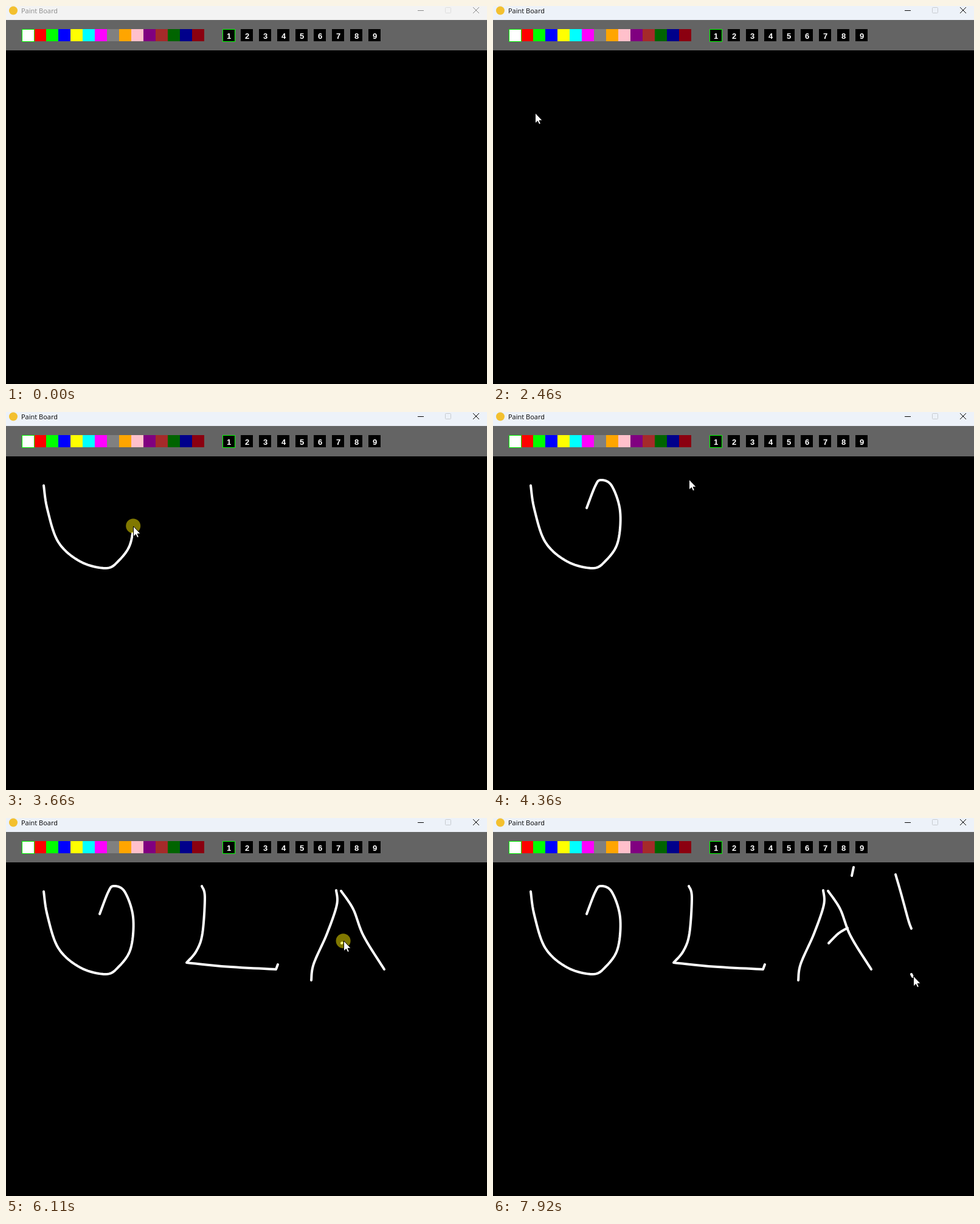
An HTML page with a canvas that plays this animation: 791x622 px, repeating every 7990 ms.

```html
<!DOCTYPE html>
<html lang="en">
<head>
<meta charset="utf-8">
<title>Paint Board</title>
<style>
  html, body { margin: 0; width: 100%; height: 100%; overflow: hidden; background: #000; }
  canvas { display: block; width: 791px; height: 622px; }
</style>
</head>
<body>
<canvas id="stage" width="791" height="622"></canvas>
<script>
const ctx = document.getElementById('stage').getContext('2d');
const LOOP = 7990;
const INK_LAG = 15;
const SETTLE = 60;

const palette = ['white', 'red', 'lime', 'blue', 'yellow', 'cyan', 'magenta', 'gray',
  'orange', 'pink', 'purple', 'brown', 'darkgreen', 'darkblue', '#8b0010'];

// Pen strokes; a repeated point makes a sharp corner.
const strokes = [
  pen(3290, 3860, [[62,121],[68,160],[86,214],[122,246],[164,257],[185,245],[205,215],
    [209,163],[195,121],[177,112],[168,122],[154,158]]),
  pen(4410, 4925, [[322,112],[327,130],[323,190],[313,219],[297,238],[297,238],
    [362,244.5],[444,249],[444,249],[447,241]]),
  pen(5150, 5410, [[543,119],[544,143],[528,190],[506,240],[502,267]]),
  pen(5550, 5840, [[551,120],[571,150],[588,194],[622,249]]),
  pen(6095, 6310, [[552,206],[568,190],[583,181]]),
  pen(6655, 6800, [[593,81],[590,95]]),
  pen(7020, 7370, [[662,93],[671,124],[683,168],[688,182]]),
  pen(7700, 7840, [[688,257],[690,261]])
];

// Pointer stops as time, x, y; the pen ends are added to them.
const stops = [
  [130,563,490], [410,269,264], [480,269,264], [690,167,143], [830,167,143], [1300,76,110],
  [1570,76,110], [1640,85,132], [2200,85,132], [2400,70,160], [2700,66,238], [3090,62,120],
  [7440,690,186], [7870,691,260]
];
for (const { from, to, pts } of strokes) {
  const a = pts[0], b = pts[pts.length - 1];
  stops.push([from - SETTLE, a.x, a.y - 1], [from, a.x, a.y - 1], [to, b.x, b.y - 1]);
}
stops.sort((a, b) => a[0] - b[0]);

function clamp(v) { return Math.max(0, Math.min(1, v)); }
function lerp(a, b, k) { return a + (b - a) * k; }

function pen(from, to, knots) {
  return { from, to, pts: spline(knots) };
}

// Catmull-Rom curve sampled with its running length.
function spline(knots) {
  const at = i => knots[Math.max(0, Math.min(knots.length - 1, i))];
  const mix = (a, b, c, d, u) => 0.5 * (2 * b + (c - a) * u +
    (2 * a - 5 * b + 4 * c - d) * u * u + (3 * b - a - 3 * c + d) * u ** 3);
  const out = [{ x: knots[0][0], y: knots[0][1], len: 0 }];
  for (let i = 0; i < knots.length - 1; i++) {
    const [a, b, c, d] = [at(i - 1), at(i), at(i + 1), at(i + 2)];
    if (b[0] === c[0] && b[1] === c[1]) continue;
    for (let s = 1; s <= 10; s++) {
      const x = mix(a[0], b[0], c[0], d[0], s / 10);
      const y = mix(a[1], b[1], c[1], d[1], s / 10);
      const last = out[out.length - 1];
      out.push({ x, y, len: last.len + Math.hypot(x - last.x, y - last.y) });
    }
  }
  return out;
}

function headOf({ pts, from, to }, t) {
  const goal = pts[pts.length - 1].len * clamp((t - from) / (to - from));
  let i = 1;
  while (i < pts.length - 1 && pts[i].len < goal) i++;
  const a = pts[i - 1], b = pts[i];
  const k = clamp((goal - a.len) / (b.len - a.len));
  return { i, x: lerp(a.x, b.x, k), y: lerp(a.y, b.y, k) };
}

function pointerAt(t, active) {
  if (active) {
    const head = headOf(active, t + INK_LAG);
    return { x: head.x, y: head.y - 1 };
  }
  const next = stops.findIndex(s => s[0] > t);
  const b = stops[next < 0 ? stops.length - 1 : next];
  const a = next < 0 ? b : stops[next - 1];
  const k = a === b ? 0 : (t - a[0]) / (b[0] - a[0]);
  return { x: lerp(a[1], b[1], k), y: lerp(a[2], b[2], k) };
}

function fill(color, x, y, w, h) {
  ctx.fillStyle = color;
  ctx.fillRect(x, y, w, h);
}

function disc(color, x, y, r) {
  ctx.fillStyle = color;
  ctx.beginPath();
  ctx.arc(x, y, r, 0, Math.PI * 2);
  ctx.fill();
}

function blend(from, to, k) {
  return `rgb(${from.map((v, i) => Math.round(lerp(v, to[i], k)))})`;
}

function titleBar(focus) {
  fill(blend([243, 243, 243], [237, 242, 249], focus), 0, 0, 791, 23);
  disc('#f3c02f', 12, 7.5, 7);

  const ink = blend([138, 138, 138], [0, 0, 0], focus);
  ctx.fillStyle = ink;
  ctx.font = '11px "Open Sans", "Noto Sans", sans-serif';
  ctx.textAlign = 'left';
  ctx.fillText('Paint Board', 25, 12);

  fill(ink, 677, 7, 10, 1);
  ctx.lineWidth = 1;
  ctx.strokeStyle = blend([222, 222, 222], [198, 202, 207], focus);
  ctx.beginPath();
  ctx.roundRect(722.5, 2.5, 9, 9, 1);
  ctx.stroke();
  ctx.strokeStyle = ink;
  ctx.beginPath();
  ctx.moveTo(768, 2); ctx.lineTo(778, 12);
  ctx.moveTo(778, 2); ctx.lineTo(768, 12);
  ctx.stroke();
}

function toolbar() {
  fill('#646464', 0, 23, 791, 50);
  palette.forEach((color, i) => fill(color, 26 + i * 20, 38, 20, 20));
  ctx.font = 'bold 13px "Liberation Sans", Arial, sans-serif';
  ctx.textAlign = 'center';
  for (let n = 1; n <= 9; n++) {
    const x = 326 + n * 30;
    fill('#000', x, 38, 20, 20);
    ctx.fillStyle = '#fff';
    ctx.fillText(n, x + 10.5, 54);
  }
  ctx.lineWidth = 1;
  ctx.strokeStyle = '#0f0';
  ctx.strokeRect(26.5, 38.5, 20, 20);
  ctx.strokeRect(356.5, 38.5, 20, 20);
}

function drawInk(stroke, t) {
  if (t < stroke.from) return;
  const head = headOf(stroke, t);
  ctx.save();
  ctx.strokeStyle = '#fff';
  ctx.lineWidth = 4;
  ctx.lineCap = ctx.lineJoin = 'round';
  ctx.beginPath();
  stroke.pts.slice(0, head.i).forEach(p => ctx.lineTo(p.x, p.y));
  ctx.lineTo(head.x + 0.01, head.y);
  ctx.stroke();
  ctx.restore();
}

const arrow = new Path2D('M.5 0V17L4.4 13.4L6.8 18.7L9.4 17.6L7.1 12.4L12 12.2Z');

function drawPointer({ x, y }) {
  ctx.save();
  ctx.translate(Math.round(x), Math.round(y));
  ctx.fillStyle = '#fff';
  ctx.fill(arrow);
  ctx.strokeStyle = '#000';
  ctx.lineWidth = 1;
  ctx.stroke(arrow);
  ctx.restore();
}

function draw(time) {
  // The screen is sampled every 70 ms.
  const phase = time < 1300 ? 60 : 10;
  const t = Math.floor((time - phase) / 70) * 70 + phase;
  const active = strokes.find(s => t >= s.from && t <= s.to);

  fill('#000', 0, 0, 791, 622);
  titleBar(clamp((t - 2320) / 150));
  toolbar();
  strokes.forEach(s => drawInk(s, t));
  if (t < 130) return;
  const pointer = pointerAt(t, active);
  if (active) disc('rgba(255, 240, 0, 0.5)', pointer.x, pointer.y, 12);
  drawPointer(pointer);
}

const start = performance.now();
function loop() {
  draw((performance.now() - start) % LOOP);
  requestAnimationFrame(loop);
}
loop();
</script>
</body>
</html>
```
